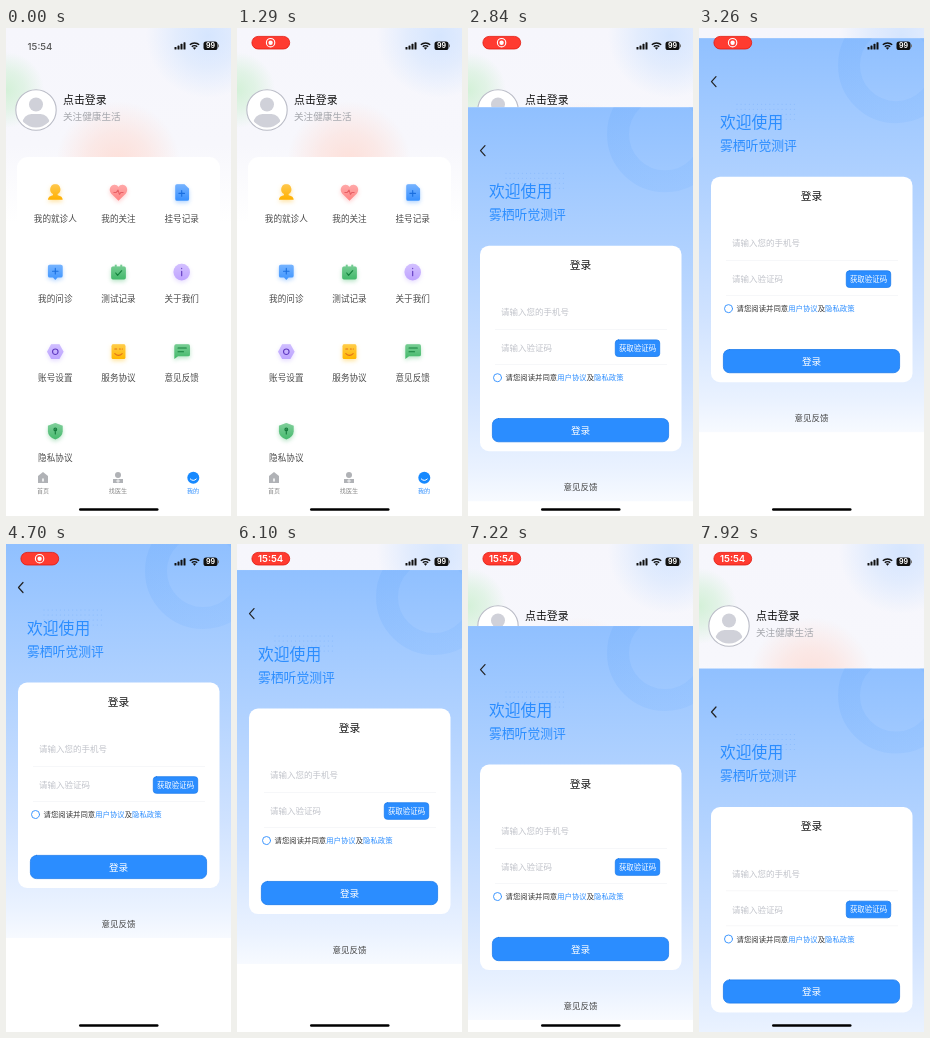
These frames come from a looping animation (225x488 px, 8 s). An HTML page with a canvas:

```html
<!DOCTYPE html>
<html lang="zh-CN">
<head>
<meta charset="utf-8">
<style>
html, body { margin: 0; width: 100%; height: 100%; overflow: hidden; background: #fff; }
canvas { display: block; width: 100vw; height: 100vh; }
</style>
</head>
<body>
<canvas></canvas>
<script>
const W = 225, H = 488, LOOP = 8000;
const CJK = '"Noto Sans CJK SC", "Noto Sans CJK", sans-serif';
const LATIN = 'Inter, sans-serif';
const BLUE = '#2b8dff', RED = '#ff3b30';
const canvas = document.querySelector('canvas');
const ctx = canvas.getContext('2d');

const ramp = (t, from, to) => Math.max(0, Math.min(1, (t - from) / (to - from)));

// y is the optical middle of the line
function text(str, x, y, size, color, { align = 'left', weight = 400, font = CJK } = {}) {
  ctx.font = `${weight} ${size}px ${font}`;
  ctx.textAlign = align;
  ctx.fillStyle = color;
  ctx.fillText(str, x, y + size * 0.37);
  return x + ctx.measureText(str).width;
}

function box(x, y, w, h, r, color, edge) {
  ctx.fillStyle = color;
  ctx.beginPath();
  ctx.roundRect(x, y, w, h, r);
  ctx.fill();
  if (edge) {
    ctx.strokeStyle = edge;
    ctx.lineWidth = 0.8;
    ctx.stroke();
  }
}

function disc(x, y, r, color) {
  ctx.fillStyle = color;
  ctx.beginPath();
  ctx.arc(x, y, r, 0, 7);
  ctx.fill();
}

function ring(x, y, r, width, color) {
  ctx.strokeStyle = color;
  ctx.lineWidth = width;
  ctx.beginPath();
  ctx.arc(x, y, r, 0, 7);
  ctx.stroke();
}

function fillPath(d, color) {
  ctx.fillStyle = color;
  ctx.fill(new Path2D(d));
}

function strokePath(d, color, width = 1.2) {
  ctx.strokeStyle = color;
  ctx.lineWidth = width;
  ctx.lineCap = ctx.lineJoin = 'round';
  ctx.stroke(new Path2D(d));
}

// stops: [position, colour] pairs
function gradient(x0, y0, x1, y1, ...stops) {
  const g = ctx.createLinearGradient(x0, y0, x1, y1);
  for (const [at, color] of stops) g.addColorStop(at, color);
  return g;
}

function glow(x, y, r, rgb, alpha) {
  const g = ctx.createRadialGradient(x, y, 0, x, y, r);
  g.addColorStop(0, `rgba(${rgb},${alpha})`);
  g.addColorStop(0.5, `rgba(${rgb},${alpha * 0.6})`);
  g.addColorStop(1, `rgba(${rgb},0)`);
  ctx.fillStyle = g;
  ctx.fillRect(0, 0, W, 200);
}

// Menu icons: label, main colour, body, detail, detail colour
const BUBBLE = 'M-6-8H6Q8-8 8-6V4Q8 6 6 6H2.5L0 8.5L-2.5 6H-6Q-8 6-8 4V-6Q-8-8-6-8Z';
const MENU = [
  ['我的就诊人', '#ffb000', 'M0-9A5 5.5 0 0 1 2.5 1.5V3Q8 4 8 8H-8Q-8 4-2.5 3V1.5A5 5.5 0 0 1 0-9Z'],
  ['我的关注', '#ff8585', 'M0 9L-8 1C-13-6-4-12 0-6C4-12 13-6 8 1Z', 'M-5 0H-2.5L-.5-2.5L1 2L2.5 0H5', '#e85f64'],
  ['挂号记录', '#3b92ff', 'M-5-9H3L8-4V7Q8 9 6 9H-5Q-7 9-7 7V-7Q-7-9-5-9Z', 'M-3 1H3M0-2V4', '#1a6fe0'],
  ['我的问诊', '#4096ff', BUBBLE, 'M-3-1H3M0-4V2', '#1a6fe0'],
  ['测试记录', '#43b96b', 'M-6-6H-4V-8H-2V-6H2V-8H4V-6H6Q8-6 8-4V6Q8 8 6 8H-6Q-8 8-8 6V-4Q-8-6-6-6Z', 'M-3 1L-1 3.5L3.5-1.5', '#14803c'],
  ['关于我们', '#c0a5ff', 'M-9 0A9 9 0 0 1 9 0A9 9 0 0 1-9 0Z', 'M0-4V-3.8M0-1V4', '#5f38c0'],
  ['账号设置', '#bda4ff', 'M-4.5-8H4.5L9 0L4.5 8H-4.5L-9 0Z', 'M-3 0A3 3 0 0 1 3 0A3 3 0 0 1-3 0Z', '#5f38c0'],
  ['服务协议', '#ffb800', 'M-6-8H6Q7.5-8 7.5-6V6Q7.5 8 6 8H-6Q-7.5 8-7.5 6V-6Q-7.5-8-6-8Z', 'M-4-3H-2M1-3H2M4-3H4.2M-4 2Q0 6 4 2', '#e0701c'],
  ['意见反馈', '#42b969', 'M-6-8H7Q9-8 9-6V3Q9 5 7 5H-4L-8 8V-6Q-8-8-6-8Z', 'M-4-4H5M-4 0H2', '#14803c'],
  ['隐私协议', '#4abb70', 'M0-9L8-6V0Q8 6 0 9Q-8 6-8 0V-6Z', 'M0-2V3M-1.5-2A1.5 1.5 0 0 1 1.5-2A1.5 1.5 0 0 1-1.5-2Z', '#167a3c'],
];

function drawMenuItem([label, color, shape, detail, detailColor], i) {
  const x = 49.3 + (i % 3) * 63.2, y = 164.5 + Math.floor(i / 3) * 79.6;
  ctx.save();
  ctx.translate(x, y);
  ctx.scale(0.92, 0.92);
  ctx.save();
  ctx.shadowColor = color + '60';
  ctx.shadowBlur = 4 * canvas.width / W;
  ctx.shadowOffsetY = 2 * canvas.height / H;
  fillPath(shape, color);
  ctx.restore();
  fillPath(shape, gradient(0, -9, 0, 8, [0, 'rgba(255,255,255,.3)'], [1, 'rgba(255,255,255,0)']));
  if (detail) strokePath(detail, detailColor);
  ctx.restore();
  text(label, x, y + 26.3, 8.6, '#4a4a4a', { align: 'center' });
}

function drawTabs() {
  const gray = '#b0b2b6';
  ctx.save();
  ctx.translate(37, 450);
  fillPath('M0-6L5-2V5H-5V-2Z', gray);
  strokePath('M0 1V3', '#fff', 1.5);
  ctx.translate(75, 0);
  disc(0, -3, 3, gray);
  fillPath('M-5 1H5V5H-5Z', gray);
  strokePath('M-1.5 3H1.5M0 1.500V4.500', '#fff', 0.8);
  ctx.translate(75.3, 0);
  disc(0, -0.3, 6, '#1689ff');
  strokePath('M-3 1Q0 4 3 1', '#fff', 1);
  ctx.restore();
  ['首页', '找医生', '我的'].forEach((label, i) =>
    text(label, 37 + i * 75, 463, 6.1, i === 2 ? BLUE : '#888', { align: 'center' }));
}

function drawProfile() {
  ctx.fillStyle = gradient(0, 0, 0, 195, [0, '#f6f6fc'], [0.6, '#f7f7fc'], [1, '#fff']);
  ctx.fillRect(0, 0, W, H);
  glow(202, 8, 62, '205,225,255', 0.8);
  glow(0, 62, 38, '208,240,212', 0.9);
  glow(112, 135, 62, '255,215,205', 0.75);

  disc(30, 82, 20.5, '#fff');
  ring(30, 82, 20.2, 1.1, '#b9bbc6');
  ctx.save();
  ctx.beginPath();
  ctx.arc(30, 82, 17.5, 0, 7);
  ctx.clip();
  disc(30, 76.5, 7, '#d0d1d9');
  box(16.5, 86, 27, 20, 9, '#d0d1d9');
  ctx.restore();
  text('点击登录', 57, 71.5, 10.9, '#111', { weight: 500 });
  text('关注健康生活', 57, 88.7, 9.65, '#a3a5ab');

  box(11, 129, 203, 400, 11, '#fff');
  MENU.forEach(drawMenuItem);
  drawTabs();
}

function drawLogin(top) {
  ctx.save();
  ctx.translate(0, top);
  ctx.fillStyle = '#fff';
  ctx.fillRect(0, 0, W, H);
  ctx.fillStyle = gradient(0, 0, 0, 394,
    [0, '#90c0ff'], [0.2, '#a2caff'], [0.4, '#b3d3ff'], [0.7, '#cfe2ff'], [0.92, '#eaf2ff'], [1, '#f7faff']);
  ctx.fillRect(0, 0, W, 394);

  ctx.save();
  ctx.beginPath();
  ctx.rect(0, 0, W, H);
  ctx.clip();
  ring(197, 27, 47, 22, gradient(140, 0, 225, 84, [0, 'rgba(115,175,252,.3)'], [1, 'rgba(130,185,255,.25)']));
  ctx.restore();
  for (let i = 0; i < 60; i++)
    disc(38 + (i % 15) * 4.1, 66 + Math.floor(i / 15) * 5, 0.5, 'rgba(90,155,245,.35)');

  strokePath('M17 38.5L12.5 43.5L17 48.5', '#222', 1.2);
  text('欢迎使用', 21, 84, 15.8, BLUE, { weight: 350 });
  text('雾栖听觉测评', 21, 107, 12.8, BLUE, { weight: 350 });

  box(12, 138.5, 201.5, 205.5, 9, '#fff');
  text('登录', 112.5, 158, 10.7, '#111', { align: 'center', weight: 500 });
  text('请输入您的手机号', 33, 205, 8.5, '#c0c3ca');
  text('请输入验证码', 33, 241, 8.5, '#c0c3ca');
  ctx.fillStyle = '#f3f4f6';
  ctx.fillRect(27, 222, 172, 0.7);
  ctx.fillRect(27, 257, 172, 0.7);
  box(147.3, 232.7, 44.4, 16.6, 3, BLUE, '#1c7cec');
  text('获取验证码', 169.5, 241, 7.45, '#fff', { align: 'center', weight: 500 });

  ring(29.5, 270.5, 4, 0.9, BLUE);
  let x = 37.5;
  for (const [str, color] of [['请您阅读并同意', '#333'], ['用户协议', BLUE], ['及', '#333'], ['隐私政策', BLUE]])
    x = text(str, x, 270.5, 7.38, color);

  box(24.4, 311.4, 176.2, 23.2, 6, BLUE, '#1c7cec');
  text('登录', 112.5, 323, 9.6, '#fff', { align: 'center', weight: 500 });
  text('意见反馈', 112.5, 380, 8.5, '#444', { align: 'center' });
  ctx.restore();
}

function drawStatus(t) {
  const pill = ramp(t, 20, 400), showTime = ramp(t, 5300, 5600);
  const clock = (x, y, color, weight) =>
    text('15:54', x, y, 9.6, color, { align: 'center', weight, font: LATIN });

  ctx.globalAlpha = 1 - pill;
  clock(34, 18, '#555', 500);
  ctx.globalAlpha = pill;
  box(14.9, 8.4, 37.8, 12.6, 6.3, RED, '#e3180f');
  ctx.globalAlpha = pill * (1 - showTime);
  ring(33.6, 14.7, 4.2, 1.1, '#fff');
  disc(33.6, 14.7, 2.2, '#fff');
  ctx.globalAlpha = pill * showTime;
  clock(33.6, 14.8, '#fff', 600);
  ctx.globalAlpha = 1;

  for (let i = 0; i < 4; i++) {
    const h = 2.5 + i * 1.6;
    box(168.5 + i * 3, 21.5 - h, 2, h, 0.6, '#111');
  }
  ctx.lineCap = 'butt';
  ctx.lineWidth = 1.5;
  ctx.strokeStyle = '#111';
  for (const r of [3.8, 6.6]) {
    ctx.beginPath();
    ctx.arc(188.5, 21.5, r, -Math.PI * 0.75, -Math.PI * 0.25);
    ctx.stroke();
  }
  fillPath('M188.5 21.8L186.8 19.7Q188.5 18.6 190.2 19.7Z', '#111');
  box(197.5, 13.5, 14, 8.5, 2.6, '#111');
  box(212, 16.2, 1, 3, 0.5, '#777');
  text('99', 204.5, 17.7, 7, '#fff', { align: 'center', weight: 700, font: LATIN });
  box(73, 480.3, 79.5, 2.5, 1.25, '#000');
}

// The finger's drag, as [time, distance]
const DRAG = [[5880, 0], [5960, 9], [6100, 26], [6660, 49], [7220, 82], [7500, 95], [7920, 124.5], [LOOP, 124.5]];
const OPEN_AT = 2296;

function sheetTop(t) {
  if (t < OPEN_AT) return H;
  if (t < DRAG[0][0]) {
    const u = (t - OPEN_AT) * 0.006; // critically damped spring
    return H * (1 + u) * Math.exp(-u);
  }
  const i = DRAG.findIndex(([time]) => time > t);
  const [t0, y0] = DRAG[i - 1], [t1, y1] = DRAG[i];
  return y0 + (y1 - y0) * ramp(t, t0, t1);
}

const start = performance.now();

function frame() {
  const w = Math.round(innerWidth * devicePixelRatio), h = Math.round(innerHeight * devicePixelRatio);
  if (canvas.width !== w || canvas.height !== h) {
    canvas.width = w;
    canvas.height = h;
  }
  ctx.setTransform(w / W, 0, 0, h / H, 0, 0);
  const t = (performance.now() - start) % LOOP, top = sheetTop(t);
  drawProfile();
  if (top < H) drawLogin(top);
  drawStatus(t);
  requestAnimationFrame(frame);
}
frame();
</script>
</body>
</html>
```
